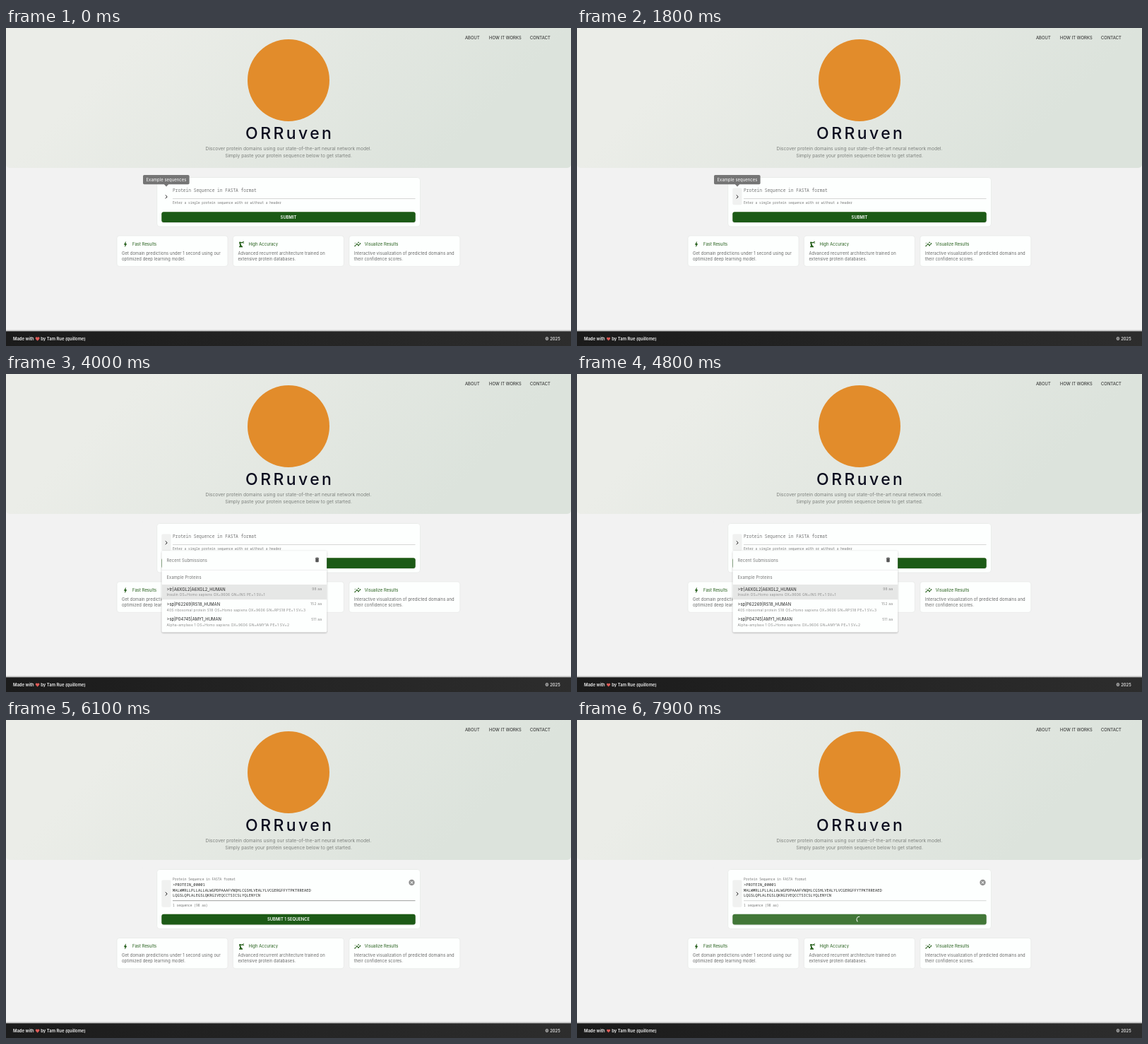
An HTML page for the animation above (8000 ms loop, 800 by 450 pixels).

```html
<!DOCTYPE html>
<html lang="en">
<head>
<meta charset="utf-8">
<style>
html, body { margin: 0; width: 100%; height: 100%; overflow: hidden; background: #f2f2f2; }
svg { display: block; width: 800px; height: 450px; }
text { font: 5.83px Inter, sans-serif; white-space: pre; }
.mono { font-family: "Noto Sans Mono", monospace; }
.mid { text-anchor: middle; }
.end { text-anchor: end; }
.nav { letter-spacing: .015em; fill: #1d1d1d; }
.intro { font-size: 6.67px; fill: #7d817d; text-anchor: middle; }
.brand { font-size: 23px; font-weight: 500; letter-spacing: 3.4px; fill: #0b0c1e; text-anchor: middle; }
.body { letter-spacing: .0179em; fill: #666; }
.title { letter-spacing: .015em; fill: #1f5a14; }
.entry { letter-spacing: .007em; fill: #222; }
.small { font-size: 5px; letter-spacing: .0333em; fill: #8c8c8c; }
.label { font-size: 6.2px; fill: #777; }
.hint { font-size: 4.58px; fill: #777; }
.seq { font-size: 5.45px; fill: #222; }
.foot { font-weight: 600; letter-spacing: .007em; fill: #f4f4f4; }
.panel { fill: #fdfffe; stroke: #e3e5e3; stroke-width: .6; }
</style>
</head>
<body>
<svg viewBox="0 0 800 450">
  <defs>
    <linearGradient id="hero" gradientUnits="userSpaceOnUse" x1="250" y1="-50" x2="550" y2="250">
      <stop stop-color="#ebede8"/><stop offset="1" stop-color="#dce3dc"/>
    </linearGradient>
    <linearGradient id="bar"><stop stop-color="#1b1b1b"/><stop offset="1" stop-color="#2d2d2d"/></linearGradient>
    <linearGradient id="fall" x2="0" y2="1"><stop stop-opacity="0"/><stop offset="1" stop-opacity=".3"/></linearGradient>
    <filter id="shade" x="-10%" y="-10%" width="120%" height="125%">
      <feDropShadow dx="0" dy=".8" stdDeviation=".9" flood-opacity=".38"/>
    </filter>
    <filter id="soft" x="-5%" y="-20%" width="110%" height="150%">
      <feDropShadow dx="0" dy=".5" stdDeviation=".4" flood-opacity=".25"/>
    </filter>
  </defs>
  <rect width="800" height="450" fill="#f2f2f2"/>
  <path d="M0 0H800V193a5 5 0 0 1-5 5H5a5 5 0 0 1-5-5z" fill="url(#hero)"/>
  <text class="nav" x="650" y="15.6">ABOUT</text>
  <text class="nav" x="684" y="15.6">HOW IT WORKS</text>
  <text class="nav" x="742" y="15.6">CONTACT</text>
  <circle cx="400" cy="74" r="58" fill="#e28c2b"/>
  <text class="brand" x="401.7" y="157.3">ORRuven</text>
  <text class="intro" x="400" y="172.6">Discover protein domains using our state-of-the-art neural network model.</text>
  <text class="intro" x="400" y="182.6">Simply paste your protein sequence below to get started.</text>

  <rect id="form" class="panel" x="213.7" y="211.5" width="372.8" rx="4"/>
  <rect id="toggle" x="220.3" y="226.5" width="13.2" rx="2"/>
  <path id="chevron" d="M-1.3-2.4L1.2 0L-1.3 2.4" fill="none" stroke="#222" stroke-width="1"/>
  <text id="label" class="mono label">Protein Sequence in FASTA format</text>
  <g id="filled">
    <text class="mono seq" x="236" y="235.2">&gt;PROTEIN_00001</text>
    <text class="mono seq" x="236" y="242.8">MALWMRLLPLLALLALWGPDPAAAFVNQHLCGSHLVEALYLVCGERGFFYTPKTRREAED</text>
    <text class="mono seq" x="236" y="250.4">LQGSLQPLALEGSLQKRGIVEQCCTSICSLYQLENYCN</text>
    <path transform="translate(569.5 225) scale(.4167)" fill="#8f8f8f" d="M12 2C6.47 2 2 6.47 2 12s4.47 10 10 10 10-4.47 10-10S17.53 2 12 2zm5 13.59L15.59 17 12 13.41 8.41 17 7 15.59 10.59 12 7 8.41 8.41 7 12 10.59 15.59 7 17 8.41 13.41 12 17 15.59z"/>
  </g>
  <g id="lower">
    <rect id="line" x="236" y="241" width="343.5" height=".6"/>
    <text id="hint" class="mono hint" x="236" y="249.2"></text>
    <rect id="button" x="220.3" y="260.2" width="359.4" height="14.8" rx="3" filter="url(#soft)"/>
    <text id="submit" class="mid" x="400" y="269.8" fill="#fff" style="font-weight:600"></text>
    <g id="spinner" transform="translate(400 267.7)">
      <circle id="arc" r="4" fill="none" stroke="#fff" stroke-width="1"/>
    </g>
    <g id="cards"></g>
  </g>

  <g id="tip">
    <rect x="194" y="208" width="65.6" height="13.2" rx="1.8" fill="#757575"/>
    <path d="M223.8 221h6.4l-3.2 3.4z" fill="#757575"/>
    <text class="body mid" x="227" y="216.8" style="fill:#fff">Example sequences</text>
  </g>

  <g id="menu">
    <rect x="220.7" y="250.2" width="233.4" height="115" rx="1.5" fill="#fdfffe" filter="url(#shade)"/>
    <rect id="pick" x="220.7" y="298" width="233.4" height="21.2"/>
    <rect x="220.7" y="277" width="233.4" height=".5" fill="#dcdcdc"/>
    <text class="body" x="227.5" y="266" style="fill:#757575">Recent Submissions</text>
    <text class="body" x="227.5" y="289.6" style="fill:#757575">Example Proteins</text>
    <path transform="translate(436 258.4) scale(.375)" fill="#555" d="M6 19c0 1.1.9 2 2 2h8c1.1 0 2-.9 2-2V7H6v12zM19 4h-3.5l-1-1h-5l-1 1H5v2h14V4z"/>
    <g id="items"></g>
  </g>

  <rect y="426.5" width="800" height="2.7" fill="url(#fall)"/>
  <rect y="429.2" width="800" height="20.8" fill="url(#bar)"/>
  <text class="foot" x="10" y="441.8">Made with</text>
  <path id="heart" fill="#dc5a56" d="M12 21.35l-1.45-1.32C5.4 15.36 2 12.28 2 8.5 2 5.42 4.42 3 7.5 3c1.74 0 3.41.81 4.5 2.09C13.09 3.81 14.76 3 16.5 3 19.58 3 22 5.42 22 8.5c0 3.78-3.4 6.86-8.55 11.54L12 21.35z"/>
  <text class="foot" x="49.3" y="441.8">by Tam Rue (quillome)</text>
  <text class="foot end" x="784.8" y="441.8" style="font-weight:500">© 2025</text>
</svg>
<script>
const $ = id => document.getElementById(id);
const set = (id, attrs) => { for (const k in attrs) $(id).setAttribute(k, attrs[k]); };

const icons = [
  '<path d="M11 21h-1l1-7H7.5c-.58 0-.57-.32-.38-.66C8.48 10.94 10.42 7.54 13 3h1l-1 7h3.5c.49 0 .56.33.47.51C12.96 17.55 11 21 11 21z"/>',
  '<path d="M4 22v-2c0-1 .8-2 2-2h1L5 9h4l4 9h1c1.1 0 2 1 2 2v2zM15 4l5-2 1 1.5-4 2 4 2.5-1 1.5-5-3z"/><circle cx="7" cy="6.5" r="3"/><path d="M8 5h8v3H8z"/>',
  '<path d="M21 8c-1.45 0-2.26 1.44-1.93 2.51l-3.55 3.56c-.3-.09-.74-.09-1.04 0l-2.55-2.55C12.27 10.45 11.46 9 10 9c-1.45 0-2.27 1.44-1.93 2.52l-4.56 4.55C2.44 15.74 1 16.55 1 18c0 1.1.9 2 2 2 1.45 0 2.26-1.44 1.93-2.51l4.55-4.56c.3.09.74.09 1.04 0l2.55 2.55C12.73 16.55 13.54 18 15 18c1.45 0 2.27-1.44 1.93-2.52l3.56-3.55C21.56 12.26 23 11.45 23 10c0-1.1-.9-2-2-2zM15 9l.94-2.07L18 6l-2.06-.93L15 3l-.92 2.07L12 6l2.08.93zM3.5 11L4 9l2-.5L4 8l-.5-2L3 8l-2 .5L3 9z"/>'
];
const cards = [
  ['Fast Results', 'Get domain predictions under 1 second using our', 'optimized deep learning model.'],
  ['High Accuracy', 'Advanced recurrent architecture trained on', 'extensive protein databases.'],
  ['Visualize Results', 'Interactive visualization of predicted domains and', 'their confidence scores.']
];
$('cards').innerHTML = cards.map(([title, a, b], i) => `
  <g transform="translate(${157 + 164.4 * i} 294)">
    <rect class="panel" width="157" height="43.3" rx="3.5"/>
    <g transform="translate(7 7) scale(.4167)" fill="#1f5a14">${icons[i]}</g>
    <text class="title" x="22" y="13.8">${title}</text>
    <text class="body" x="7" y="26.6">${a}</text>
    <text class="body" x="7" y="34.9">${b}</text>
  </g>`).join('');

const items = [
  ['tr|A6XGL2|A6XGL2', 'Insulin OS=Homo sapiens OX=9606 GN=INS PE=1 SV=1', 98],
  ['sp|P62269|RS18', '40S ribosomal protein S18 OS=Homo sapiens OX=9606 GN=RPS18 PE=1 SV=3', 152],
  ['sp|P04745|AMY1', 'Alpha-amylase 1 OS=Homo sapiens OX=9606 GN=AMY1A PE=1 SV=2', 511]
];
$('items').innerHTML = items.map(([id, info, size], i) => `
  <g transform="translate(227.5 ${306.8 + 21.2 * i})">
    <text class="entry">&gt;${id}_HUMAN</text>
    <text class="small" y="7.7">${info}</text>
    <text class="small end" x="219.7" y="-.6">${size} aa</text>
  </g>`).join('');

const LOOP = 8000, OPEN = 2700, PICK = 5500, SEND = 7500;
const ramp = (t, from, span) => Math.min(1, Math.max(0, (t - from) / span));
const ease = p => p * p * (3 - 2 * p);
const fade = (t, from, span = 300) => ease(ramp(t, from, span));
const mix = (a, b, p) => `rgb(${a.map((v, i) => Math.round(v + (b[i] - v) * p))})`;

function spin(t) {
  const p = t % 1500 / 750;
  const grow = ease(Math.min(p, 1)), slide = ease(Math.max(p - 1, 0));
  set('arc', {
    'stroke-dasharray': `${(1 + 88 * grow) / 5} 40`,
    'stroke-dashoffset': -(35 * grow + 89 * slide) / 5,
    transform: `rotate(${t * .18})`
  });
}

function draw(t) {
  const full = t >= PICK, shift = full ? 14.5 : 0, sent = fade(t, SEND);
  set('form', { height: 69.5 + shift });
  set('lower', { transform: `translate(0 ${shift})` });
  set('filled', { opacity: +full });
  set('chevron', { transform: `translate(227 ${238.8 + shift / 2})` });

  const press = t < OPEN ? 0 : 1 - fade(t, OPEN + 150, 400);
  const rest = full ? fade(t, PICK + 200) : fade(t, 0);
  set('toggle', {
    height: 23.8 + shift,
    fill: mix([240, 241, 240], [185, 198, 181], press),
    opacity: rest
  });

  const lift = fade(t, PICK);
  set('label', { transform: `translate(236 ${232.2 - 5.4 * lift}) scale(${1 - .25 * lift})` });
  set('line', { fill: mix([188, 188, 188], [95, 95, 95], fade(t, PICK + 100) * (1 - sent)) });
  $('hint').textContent = full ? '1 sequence (98 aa)' : 'Enter a single protein sequence with or without a header';

  const hover = fade(t, 6600);
  set('button', { fill: sent ? mix([39, 96, 27], [66, 119, 56], sent) : mix([31, 90, 20], [39, 96, 27], hover) });
  $('submit').textContent = full ? 'SUBMIT 1 SEQUENCE' : 'SUBMIT';
  set('submit', { opacity: 1 - sent });
  set('spinner', { opacity: sent });
  spin(Math.max(0, t - SEND));

  set('tip', { opacity: 1 - fade(t, 3100) });
  set('menu', { opacity: Math.sin(ramp(t, OPEN, 200) * Math.PI / 2) * (1 - lift) });
  set('pick', { fill: full ? '#d5d6d5' : '#e6e7e6', opacity: fade(t, 3400) });

  const beat = .275 + .025 * Math.cos((t - 1300) / 1500 * 2 * Math.PI);
  set('heart', { transform: `translate(44.6 440) scale(${beat}) translate(-12 -12)` });
}

function frame() {
  draw(Math.floor(performance.now() % LOOP / 100) * 100);
  requestAnimationFrame(frame);
}
frame();
</script>
</body>
</html>
```
